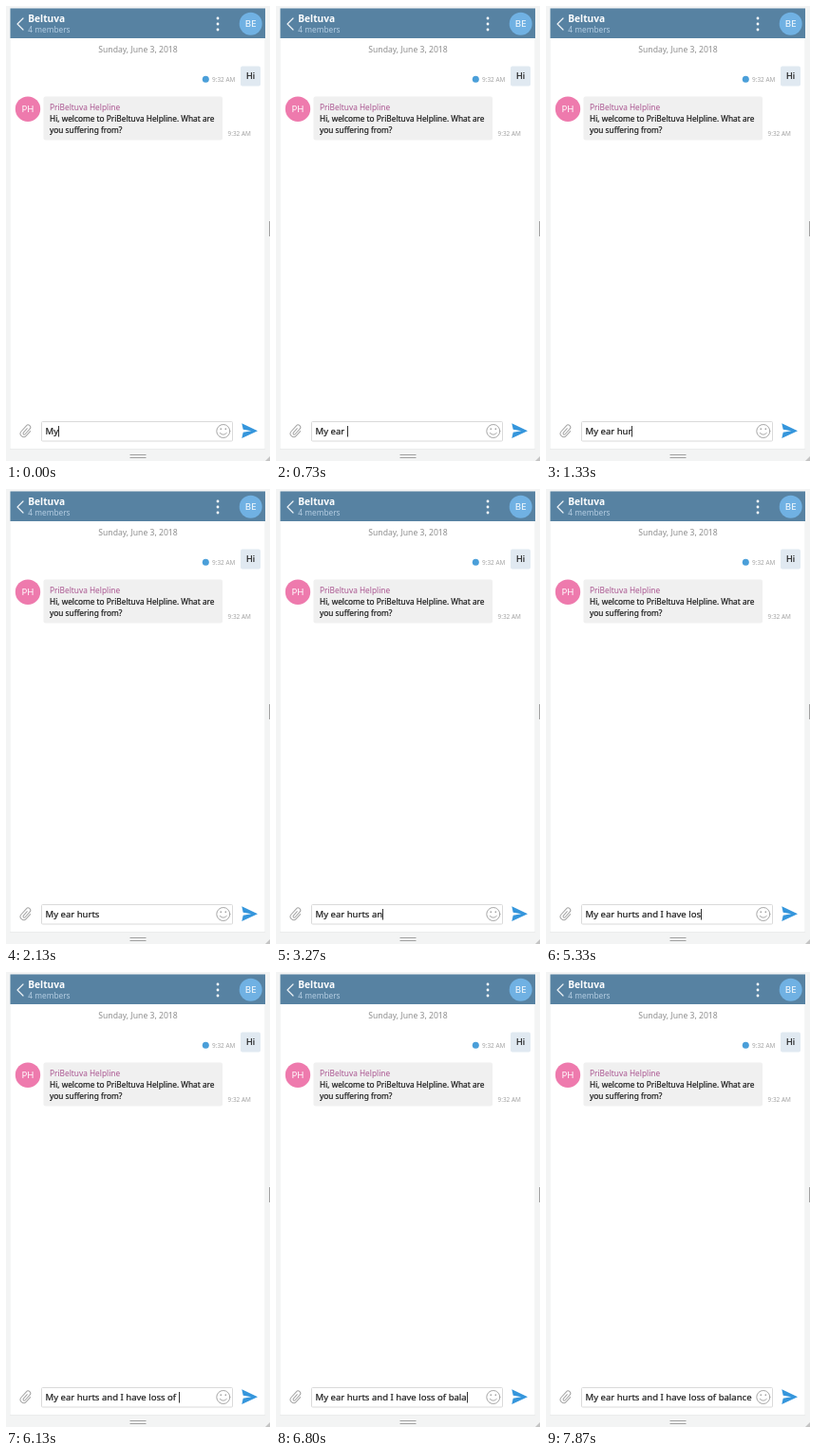
Recreate the animation shown at these times as an HTML page. Size 278 by 480 pixels, loop 8 s.

```html
<!DOCTYPE html>
<html lang="en">
<head>
<meta charset="utf-8">
<title>Helpline chat</title>
<style>
html, body { margin: 0; width: 100%; height: 100%; overflow: hidden; background: #f3f4f4; }
svg { display: block; width: 278px; height: 480px; }
text { font: 8.3px "Noto Sans", "Open Sans", sans-serif; fill: #1c1c1c; white-space: pre; }
.title { font-size: 10.15px; font-weight: 700; fill: #fff; }
.sub { fill: #b4cde2; }
.date { font-size: 8.64px; fill: #8f8f8f; text-anchor: middle; }
.time { font-size: 6.45px; fill: #a4a4a4; }
.initials { font-size: 9.7px; fill: #fff; text-anchor: middle; }
.hi { font-size: 9.1px; }
.name { fill: #aa5590; }
.strong { stroke: #1c1c1c; stroke-width: 0.2px; }
#typed { font-size: 9.55px; }
.line { fill: none; stroke: #a6a6a6; stroke-linecap: round; stroke-linejoin: round; }
</style>
</head>
<body>
<svg viewBox="0 0 278 480">
  <!-- window -->
  <rect width="278" height="480" fill="#f3f4f4"/>
  <rect x="4" y="3" width="269" height="465" fill="#ebecec"/>
  <rect x="4.5" y="3" width="268" height="464" fill="#fff"/>
  <rect x="4.5" y="2.500" width="268.500" height="31.500" fill="#5782a2"/>
  <rect x="277" y="227" width="1" height="16" fill="#a2a2a2"/>
  <path d="M130.500 473.500h17M130.500 476.500h17" stroke="#a0a0a0"/>
  <path d="M278 475v5h-5z" fill="#c4c4c4"/>

  <!-- header -->
  <path class="line" d="M18 13l-6 6 6 6" style="stroke:#f0f5f8;stroke-width:1.2"/>
  <text class="title" x="23.300" y="17">Beltuva</text>
  <text class="sub" x="23.300" y="28">4 members</text>
  <g fill="#fff">
    <circle cx="223" cy="13" r="1.400"/>
    <circle cx="223" cy="19" r="1.400"/>
    <circle cx="223" cy="25" r="1.400"/>
  </g>
  <circle cx="257.700" cy="18.700" r="12" fill="#70b1e3"/>
  <text class="initials" x="257.700" y="22.200">BE</text>

  <!-- messages -->
  <text class="date" x="139" y="49">Sunday, June 3, 2018</text>
  <circle cx="210.300" cy="77.300" r="3.500" fill="#4a9fd9"/>
  <text class="time" x="217" y="80">9:32 AM</text>
  <rect x="247" y="63.500" width="21" height="21" rx="2" fill="#e0e9f1"/>
  <text class="hi strong" x="253" y="77.300">Hi</text>

  <circle cx="23" cy="108.700" r="13.200" fill="#ee7aad"/>
  <text class="initials" x="23" y="112.300">PH</text>
  <rect x="39.500" y="95.500" width="188.500" height="46" rx="2" fill="#f0f0f0"/>
  <text class="name" x="46" y="110">PriBeltuva Helpline</text>
  <text class="strong" x="46" y="122">Hi, welcome to PriBeltuva Helpline. What are</text>
  <text class="strong" x="46" y="134">you suffering from?</text>
  <text class="time" x="233.500" y="137">9:32 AM</text>

  <!-- input bar -->
  <path class="line" transform="translate(21 448.500) rotate(42)"
    d="M3.500 -3v6.500a3.500 3.500 0 0 1-7 0v-8a2.500 2.500 0 0 1 5 0v7.500a1.200 1.200 0 0 1-2.400 0v-6"/>
  <rect x="37.500" y="438.500" width="201" height="20.500" rx="1" fill="#fff" stroke="#dadada"/>
  <g class="line">
    <circle cx="228.800" cy="448.500" r="7"/>
    <path d="M225.300 450.500q3.500 3.600 7 0"/>
    <path d="M226.300 446v.4M231.300 446v.4" stroke-width="1.600"/>
  </g>
  <path fill="#3596dc" d="M248.300 440.300l16.700 7.900-16.700 7.900 1.400-6.400 8.600-1.500-8.600-1.500z"/>
  <text id="typed" class="strong" x="41.500" y="452"></text>
  <rect id="caret" y="443" width="1" height="11.500" fill="#333"/>
</svg>
<script>
const LOOP = 8000, BLINK_OFF = 530, BLINK_ON = 1000, LEFT = 41.5;
const full = "My ear hurts and I have loss of balance";
const start = 2; // characters already typed when the loop begins
const keys = [
  130, 270, 400, 600, 730,
  1000, 1070, 1330, 1470, 1600, 2800,
  3130, 3270, 3400, 3470, 3800, 3930,
  4130, 4200, 4330, 4470, 4600,
  5070, 5200, 5330, 5470, 5600,
  5870, 6000, 6130,
  6400, 6470, 6670, 6800, 6930, 7270, 7330
];
const typed = document.getElementById("typed");
const caret = document.getElementById("caret");
const pen = document.createElement("canvas").getContext("2d");
pen.font = '9.55px "Noto Sans", "Open Sans", sans-serif';

function draw(t) {
  const count = keys.filter(k => k <= t).length;
  const text = full.slice(0, start + count);
  const idle = t - (count ? keys[count - 1] : 0);
  typed.textContent = text;
  caret.setAttribute("x", Math.round(LEFT + pen.measureText(text).width));
  const hidden = idle >= BLINK_OFF && idle < BLINK_ON;
  caret.setAttribute("visibility", hidden ? "hidden" : "visible");
}

const t0 = performance.now();
function tick() {
  draw((performance.now() - t0) % LOOP);
  requestAnimationFrame(tick);
}
tick();
</script>
</body>
</html>
```
